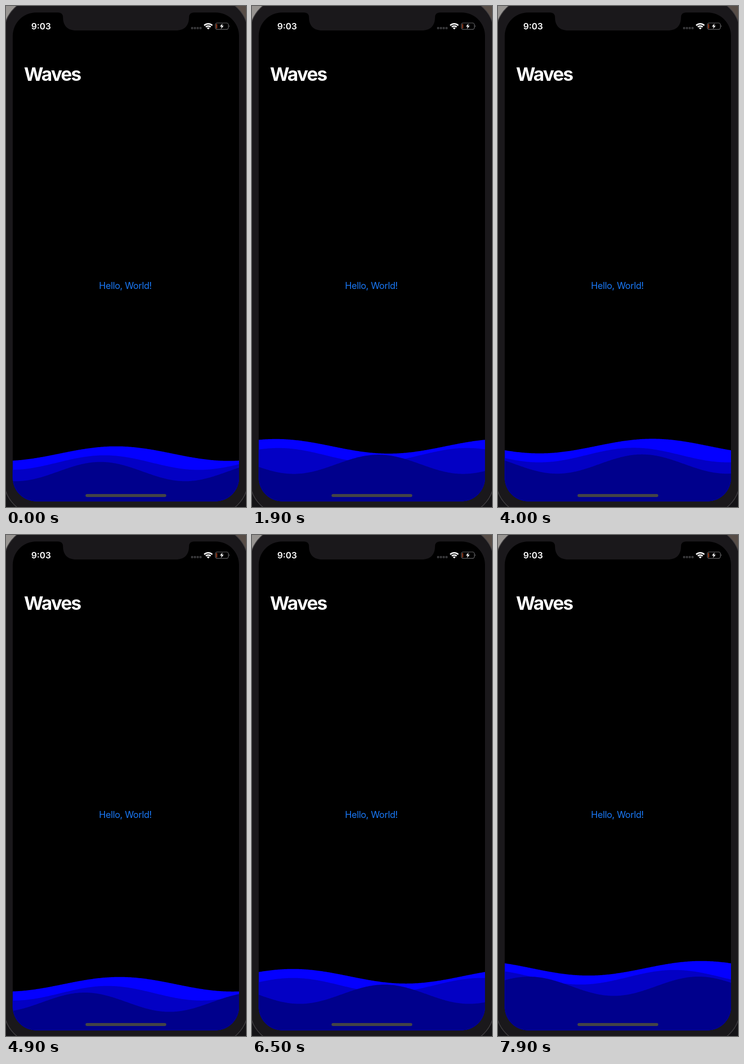
An HTML page for the animation above (8 s loop, 480 px wide and 1004 px high).

```html
<!DOCTYPE html>
<html lang="en">
<head>
<meta charset="utf-8">
<title>Waves</title>
<style>
  html, body { margin: 0; width: 100%; height: 100%; overflow: hidden; background: #111; }
  svg { display: block; width: 100vw; height: 100vh; }
  text { font-family: Inter, "Liberation Sans", sans-serif; }
</style>
</head>
<body>
<svg viewBox="0 0 480 1004">
  <defs>
    <clipPath id="screen"><rect x="13.5" y="13" width="452.5" height="979.5" rx="47"/></clipPath>
  </defs>

  <!-- desktop corners and phone body -->
  <rect width="480" height="1004" fill="#141316"/>
  <rect width="60" height="60" fill="#989592"/>
  <rect x="420" width="60" height="60" fill="#574d47"/>
  <rect x="-4" y="-16" width="488" height="1036" rx="70" fill="#1a181b" stroke="#403e41" stroke-width="1.5"/>

  <g clip-path="url(#screen)">
    <rect width="480" height="1004"/>
    <g id="waves"></g>
    <rect x="159" y="978" width="161.5" height="6" rx="3" fill="#444446"/>
  </g>

  <!-- notch -->
  <path d="M104 12H376V13Q366 13 366 23C366 40 356 49 340 49H140C124 49 114 40 114 23Q114 13 104 13Z" fill="#1a181b"/>

  <!-- status bar -->
  <text x="50.500" y="46.500" font-size="17.500" font-weight="600" fill="#fff">9:03</text>
  <g fill="#38383a">
    <rect x="370" y="42" width="4.5" height="4.5" rx="1.5"/>
    <rect x="375.6" y="42" width="4.5" height="4.5" rx="1.5"/>
    <rect x="381.2" y="42" width="4.5" height="4.5" rx="1.5"/>
    <rect x="386.8" y="42" width="4.5" height="4.5" rx="1.5"/>
  </g>
  <g transform="translate(404.5 47)" fill="none" stroke="#fff" stroke-width="2.8">
    <path d="M-8.1 -8.1A11.5 11.5 0 0 1 8.1 -8.1"/>
    <path d="M-4.9 -4.9A6.9 6.9 0 0 1 4.9 -4.9"/>
    <path d="M0 0L-2.8 -2.8A3.9 3.9 0 0 1 2.8 -2.8Z" fill="#fff" stroke="none"/>
  </g>
  <rect x="418.7" y="34" width="26" height="12.8" rx="3.6" fill="none" stroke="#69696b" stroke-width="1.2"/>
  <path d="M446.2 38.3Q448.2 40.4 446.2 42.5Z" fill="#69696b"/>
  <rect x="420.3" y="36" width="2" height="9" rx="1" fill="#a5401f"/>
  <path d="M433 35L427.8 41.3H431.2L430 46L435.4 39.6H432Z" fill="#fff"/>

  <text x="36" y="149.5" font-size="37.5" font-weight="700" letter-spacing="-2" fill="#fff">Waves</text>
  <text x="186" y="567.3" font-size="18.3" letter-spacing="-.4" fill="#1a78f5">Hello, World!</text>
</svg>
<script>
  const LOOP = 8000, STEP = 100, LEFT = 13, RIGHT = 467;

  // crest: x of a crest at time 0; speed: leftward px per ms; depth: offset below the water level
  const waves = [
    { color: '#0400ff', depth: 0,  height: 14.6, length: 452, crest: 220, speed: .0908 },
    { color: '#0300c4', depth: 18, height: 14.6, length: 377, crest: 197, speed: .0757 },
    { color: '#00008c', depth: 36, height: 19.3, length: 339, crest: 189, speed: .1448 }
  ];

  const group = document.getElementById('waves');
  for (const wave of waves) {
    wave.path = document.createElementNS('http://www.w3.org/2000/svg', 'path');
    wave.path.setAttribute('fill', wave.color);
    group.append(wave.path);
  }

  const waterLevel = t => 885 + 17.8 * Math.cos(2 * Math.PI * (t - 620) / 4680);

  function outline({ depth, height, length, crest, speed }, t) {
    const middle = waterLevel(t) + depth;
    let d = `M${LEFT} 1004`;
    for (let x = LEFT; x <= RIGHT; x += 2) {
      const angle = 2 * Math.PI * (x - crest + speed * t) / length;
      d += `L${x} ${(middle - height * Math.cos(angle)).toFixed(2)}`;
    }
    return d + 'V1004Z';
  }

  function draw(t) {
    for (const wave of waves) wave.path.setAttribute('d', outline(wave, t));
  }

  const start = performance.now();
  function tick() {
    const t = (performance.now() - start) % LOOP;
    draw(Math.floor(t / STEP) * STEP);
    requestAnimationFrame(tick);
  }
  draw(0);
  requestAnimationFrame(tick);
</script>
</body>
</html>
```
